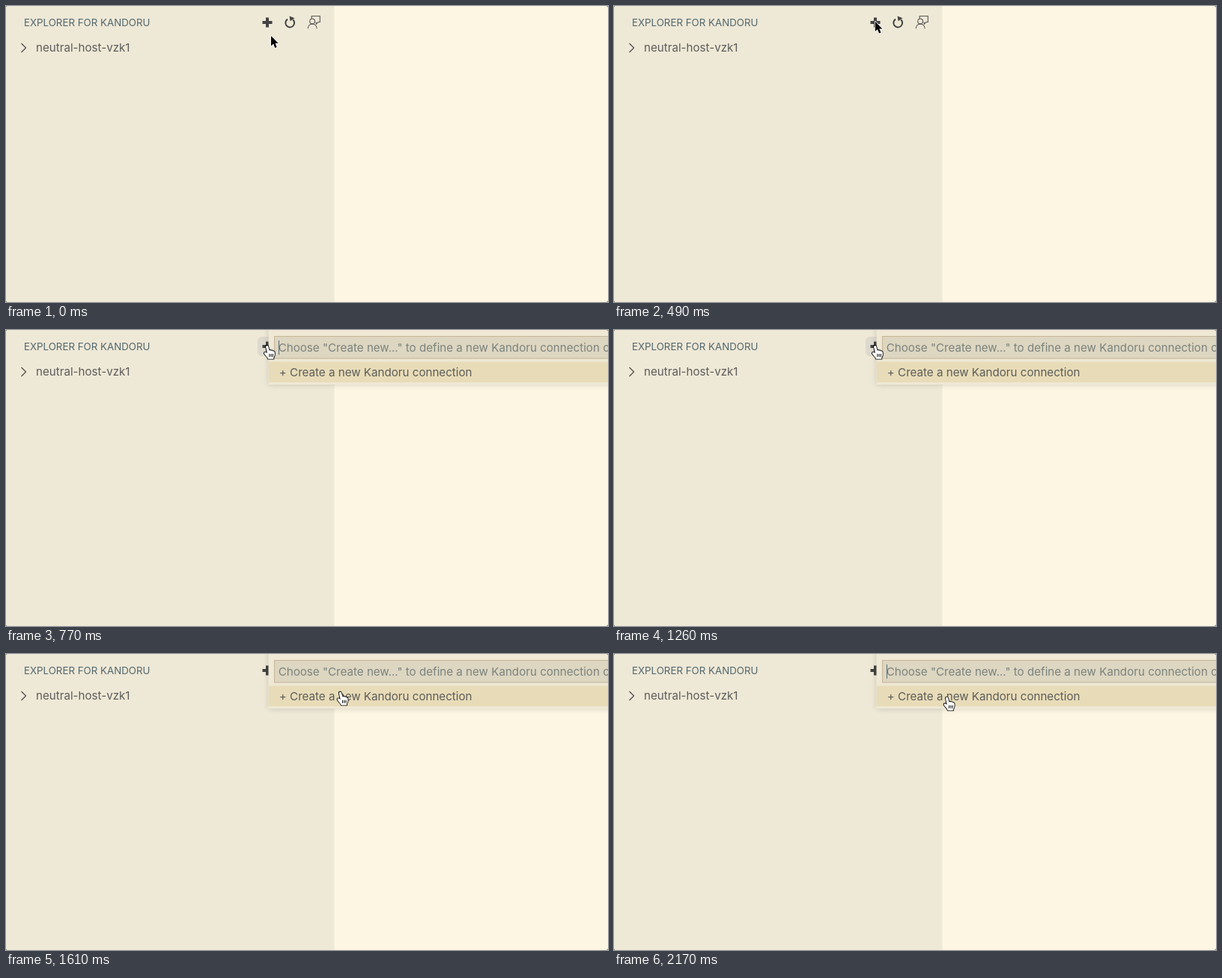
Write an HTML page with a canvas that moves like this. It is 804 by 396 pixels and loops after 2.31 s.

```html
<!DOCTYPE html>
<html lang="en">
<head>
<meta charset="utf-8">
<title>Explorer panel</title>
<style>
  html, body { margin: 0; width: 100%; height: 100%; overflow: hidden; background: #77736a; }
  canvas { display: block; width: 804px; height: 396px; }
</style>
</head>
<body>
<canvas id="stage"></canvas>
<script>
const W = 804, H = 396, LOOP = 2310, STEP = 70;
const HOVER = 630, OPEN = 770, LEAVE = 1400;
const canvas = document.getElementById('stage');
const ctx = canvas.getContext('2d');
const dpr = window.devicePixelRatio || 1;
canvas.width = W * dpr;
canvas.height = H * dpr;

// Pointer path: time, x, y of the hot spot
const path = [
  [0, 354, 40], [280, 351.3, 23.5], [490, 348.8, 20.7], [1330, 348.8, 20.7],
  [1610, 446.5, 50.5], [1890, 433.5, 58], [2170, 444.6, 57.4]
];

function pointerAt(t) {
  const i = path.findIndex(k => k[0] > t);
  if (i < 0) return path[path.length - 1].slice(1);
  const [t0, x0, y0] = path[i - 1], [t1, x1, y1] = path[i];
  const u = (t - t0) / (t1 - t0), e = u * u * (3 - 2 * u);
  return [x0 + (x1 - x0) * e, y0 + (y1 - y0) * e];
}

function box(x, y, w, h, color) {
  ctx.fillStyle = color;
  ctx.fillRect(x, y, w, h);
}

function text(str, x, y, size, color) {
  ctx.font = `400 ${size}px Inter, "Liberation Sans", sans-serif`;
  ctx.fillStyle = color;
  ctx.fillText(str, x, y);
}

function stroke(d, width, color) {
  ctx.lineWidth = width;
  ctx.strokeStyle = color;
  ctx.stroke(new Path2D(d));
}

function shape(d, fill, line, width) {
  ctx.lineJoin = 'round';
  stroke(d, width, line);
  ctx.fillStyle = fill;
  ctx.fill(new Path2D(d));
}

function icons(hover) {
  if (hover) {
    ctx.fillStyle = 'rgba(184,184,184,.33)';
    ctx.beginPath();
    ctx.roundRect(336, 9, 26, 26, 6);
    ctx.fill();
  }
  const ink = '#424242';
  box(342.5, 20, 13, 4, ink);
  box(347, 15.5, 4, 13, ink);

  ctx.lineJoin = 'miter';
  stroke('M383.2 18.2 A5.9 5.9 0 1 1 376 17.6', 2, ink);
  ctx.fillStyle = ink;
  ctx.fill(new Path2D('M378.6 13.4 L385.4 16.2 L379.6 20.2 Z'));

  stroke('M408.2 17.2 V13.5 H419.3 V21.5 H417 L414.2 24.2 V21.5', 1.1, '#555');
  stroke('M412.6 20.4 A3.4 3.4 0 1 1 405.8 20.4 A3.4 3.4 0 1 1 412.6 20.4', 1.1, '#555');
  stroke('M403.2 30.3 C403.2 22 415.2 22 415.2 30.3', 1.1, '#555');
}

function picker(caret) {
  ctx.save();
  ctx.shadowColor = 'rgba(0,0,0,.17)';
  ctx.shadowBlur = 8 * dpr;
  box(350.5, -4, 470, 77, '#eee8d5');
  ctx.restore();
  box(358, 8, 460, 30.5, '#ddd6c1');
  ctx.lineWidth = 1;
  ctx.strokeStyle = '#c8b696';
  ctx.strokeRect(358.5, 8.5, 460, 29.5);
  text('Choose "Create new..." to define a new Kandoru connection or',
    363.7, 29, 15.15, 'rgba(84,98,98,.72)');
  if (caret) box(364, 14, 1, 19, '#586e75');
  box(351, 42.5, 460, 27.5, '#e8dcb8');
  text('+ Create a new Kandoru connection', 364.8, 61.5, 15.15, '#5c5c5a');
}

function arrow() {
  shape('M0 0 V13.4 L3.1 10.6 L5.2 15.9 L7.7 14.9 L5.5 9.7 H9.6 Z', '#000', '#fff', 1.6);
}

function hand() {
  shape('M-1.7 2.2 C-2 -.2 1 -.5 1.5 1.6 L2.9 6.8 Q4.2 5.6 5.4 7 ' +
    'Q6.8 6.1 7.8 7.7 Q9.6 7.2 10 9.2 L10.1 12.4 Q9.8 14.8 8.6 16 V18 ' +
    'H1.2 Q.4 15.6 -1.8 13.7 L-3.8 11.1 Q-4.7 9.1 -2.8 8.8 Q-1.6 8.7 .2 10.4 Z',
    '#fff', '#000', 1.7);
  stroke('M3 11.2 V15.2 M5.3 11.2 V15.2 M7.5 11.2 V15.2', 1, '#000');
}

function draw(t) {
  ctx.setTransform(dpr, 0, 0, dpr, 0, 0);
  box(0, 0, W, H, '#77736a');
  ctx.save();
  ctx.beginPath();
  ctx.roundRect(0, 0, W, H, 3);
  ctx.clip();

  box(0, 0, W, H, '#fdf6e3');
  box(0, 0, 438.5, H, '#eee8d6');
  text('EXPLORER FOR KANDORU', 24, 26.6, 13.3, '#52676d');
  ctx.lineJoin = 'miter';
  stroke('M20.5 50 L26.5 56 L20.5 62', 1.3, '#505050');
  text('neutral-host-vzk1', 40, 61, 15.15, '#5c5c5a');
  icons(t >= HOVER && t < LEAVE);
  if (t >= OPEN) picker(t < 1260 || t >= 1750);

  ctx.translate(...pointerAt(t));
  if (t < HOVER) arrow(); else hand();
  ctx.restore();
}

const start = performance.now();
function tick() {
  const t = (performance.now() - start) % LOOP;
  draw(Math.floor(t / STEP) * STEP);
  requestAnimationFrame(tick);
}
tick();
</script>
</body>
</html>
```
